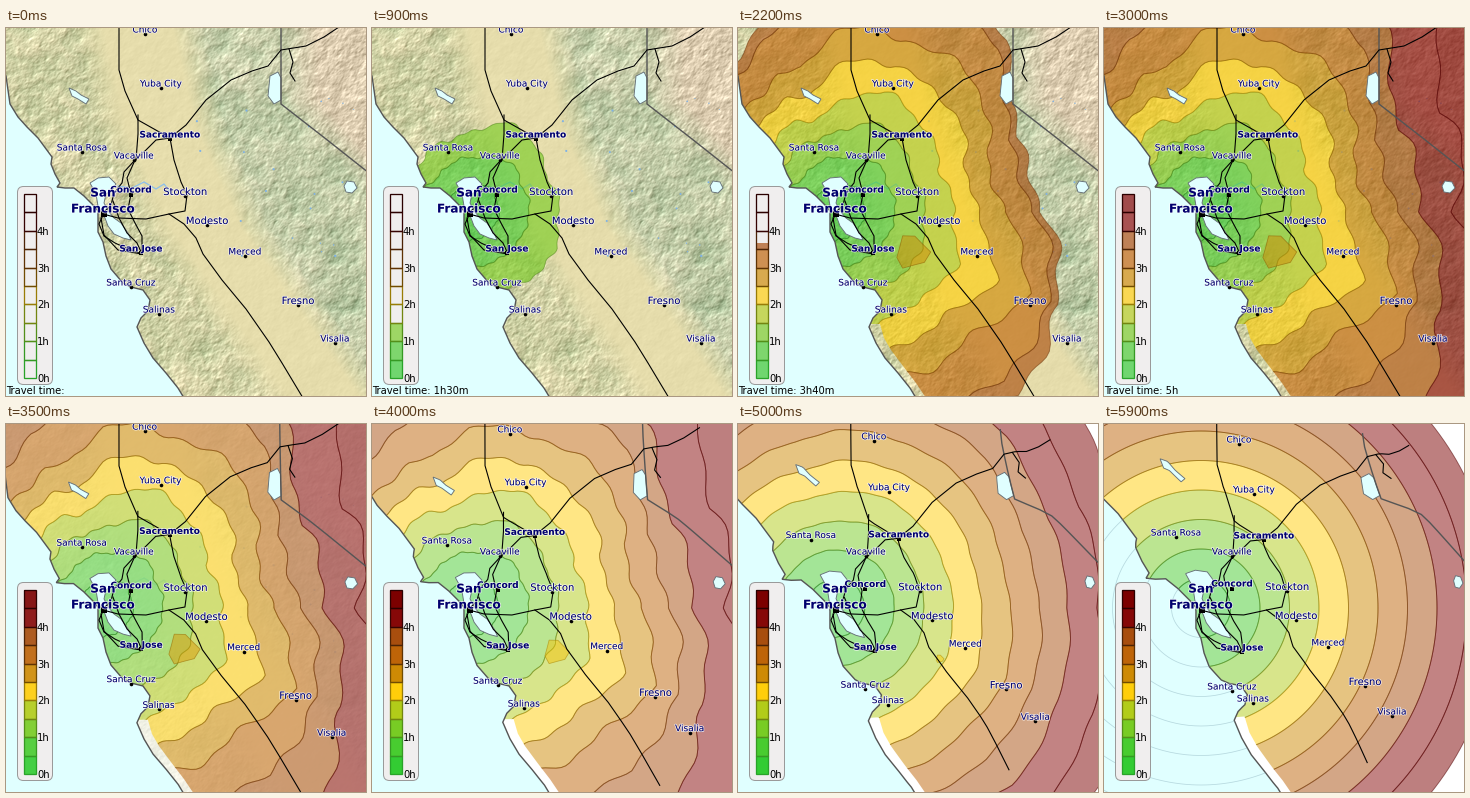
These frames come from a looping animation (360 by 368 pixels, 6 s). A matplotlib script:

```python
import numpy as np
import matplotlib.pyplot as plt
from matplotlib.animation import FuncAnimation
from matplotlib.patches import FancyBboxPatch, PathPatch, Polygon, Rectangle
from matplotlib.path import Path
from matplotlib.patheffects import withStroke

W, H = 360, 368
PX = 0.72  # points per pixel at 100 dpi
FRAMES, GROW = 60, 30
HOUR = 59  # final pixels per hour of travel
CENTER = np.array([97, 184])
NAVY = "#00006e"
WATER = "#e0ffff"

BANDS = np.array([
    (51, 204, 51), (72, 204, 48), (120, 204, 36), (178, 204, 25),
    (255, 206, 10), (206, 138, 4), (190, 100, 8), (168, 78, 14),
    (134, 8, 8), (124, 0, 0)]) / 255

# Direction in degrees (clockwise from east), then reach in pixels after 1..5 hours
REACH = np.array([
    (-157.5, 50, 100, 150, 200, 250), (-135, 48, 92, 134, 190, 250),
    (-112.5, 50, 97, 150, 225, 285), (-103, 52, 97, 147, 228, 290),
    (-90, 55, 107, 176, 240, 310), (-67.5, 60, 128, 193, 260, 340),
    (-45, 64, 128, 190, 258, 400), (-22.5, 60, 110, 166, 217, 300),
    (0, 59, 121, 167, 217, 300), (22.5, 60, 130, 208, 270, 390),
    (45, 55, 122, 188, 290, 400), (67.5, 56, 122, 173, 228, 300),
    (90, 58, 118, 177, 236, 295), (180, 59, 118, 177, 236, 295)])
KNOTS = np.array([0, 1, 2, 3, 4, 5, 9])

# name, label x/y, marker offset y, final shift x/y, size, weight
CITIES = [
    ("Chico", 139, 2, 4, -4, 14, 9, "normal"),
    ("Yuba City", 155, 56, 4, -5, 10, 9, "normal"),
    ("Sacramento", 164, 107, 4, -4, 5, 9, "bold"),
    ("Santa Rosa", 76, 120, 4, -4, -11, 9, "normal"),
    ("Vacaville", 128, 128, 4, 0, 0, 9, "normal"),
    ("Concord", 125, 162, 5, 3, -2, 9, "bold"),
    ("Stockton", 179, 164, 4, 4, -1, 10, "normal"),
    ("Modesto", 201, 193, 4, -9, -1, 10, "normal"),
    ("Merced", 239, 224, 4, -15, -5, 9, "normal"),
    ("Fresno", 292, 273, 4, -31, -15, 10, "normal"),
    ("Visalia", 329, 311, 4, -41, -23, 9, "normal"),
    ("San Jose", 135, 221, 4, 3, 3, 9, "bold"),
    ("Santa Cruz", 125, 255, 4, 3, 8, 9, "normal"),
    ("Salinas", 153, 282, 4, -4, -7, 9, "normal")]

COAST = [(-30, -10), (0, 48), (4, 76), (12, 89), (21, 99), (32, 110), (46, 129),
         (45, 136), (49, 146), (54, 155), (51, 159), (59, 160), (68, 160),
         (78, 168), (88, 178), (92, 183), (92, 204), (97, 214), (100, 228),
         (105, 241), (117, 255), (125, 259), (137, 262), (144, 272), (142, 283),
         (135, 290), (131, 299), (138, 315), (147, 330), (160, 345), (172, 360),
         (190, 390)]
INLAND = [(192, 376), (178, 355), (165, 338), (153, 322), (146, 310), (142, 296)]
LAKES = [
    [(84, 155), (92, 150), (103, 149), (110, 156), (106, 162), (100, 166),
     (98, 175), (103, 184), (108, 190), (115, 195), (122, 205), (125, 212),
     (117, 210), (108, 206), (102, 198), (99, 190), (95, 184), (92, 178), (90, 166)],
    [(264, 48), (272, 44), (275, 50), (275, 72), (268, 76), (262, 68)],
    [(63, 60), (70, 63), (75, 67), (83, 71), (80, 76), (72, 71), (66, 68)],
    [(338, 158), (341, 153), (348, 154), (351, 160), (346, 165), (340, 164)]]
ROADS = [
    [(113, -8), (113, 42), (119, 63), (132, 92), (164, 110)],
    [(132, 87), (132, 106), (130, 132)],
    [(164, 110), (180, 97), (200, 72), (225, 52), (246, 43), (262, 38),
     (275, 22), (300, 18), (318, 9), (336, -3)],
    [(283, 21), (287, 34), (284, 45), (289, 53)],
    [(164, 110), (150, 112), (140, 122), (129, 132), (118, 144), (116, 155),
     (108, 165), (105, 177), (97, 185)],
    [(164, 110), (168, 132), (175, 154), (181, 167), (179, 183), (163, 186)],
    [(97, 186), (112, 190), (140, 191), (163, 186), (178, 196), (190, 210),
     (197, 226), (216, 252), (240, 281), (263, 314), (276, 335), (297, 370)],
    [(97, 187), (93, 196), (98, 208), (109, 215), (122, 221), (136, 226)],
    [(95, 190), (98, 207), (112, 222), (136, 226)],
    [(107, 173), (113, 190), (121, 205), (131, 215), (136, 226)],
    [(129, 132), (121, 150), (125, 166), (122, 181), (129, 195), (136, 208), (136, 226)]]
BORDER = [(275, -8), (275, 76), (320, 111), (368, 149)]


def knots_at(deg):
    """Reach at every time knot for each direction."""
    cols = [np.interp(deg, REACH[:, 0], col, period=360) for col in REACH[:, 1:].T]
    return np.column_stack([0 * deg, *cols, cols[-1] * 1.8])


def densify(pts, n=5):
    pts = np.array(pts, float)
    i = np.linspace(0, len(pts) - 1, n * (len(pts) - 1) + 1)
    return np.column_stack([np.interp(i, range(len(pts)), c) for c in pts.T])


def warp(pts):
    """Place each point at a distance proportional to its travel time."""
    off = pts - CENTER
    dist = np.hypot(*off.T)
    reach = knots_at(np.degrees(np.arctan2(off[:, 1], off[:, 0])))
    hours = np.array([np.interp(d, r, KNOTS) for d, r in zip(dist, reach)])
    return CENTER + off * (hours * HOUR / np.maximum(dist, 1))[:, None]


class Shape:
    """A point list that moves from its map place to its travel-time place."""

    def __init__(self, pts, tail=(), n=5):
        self.start = densify(pts, n)
        self.end = warp(self.start)
        self.tail = np.array(tail, float).reshape(-1, 2)

    def at(self, s):
        return np.vstack([self.start + (self.end - self.start) * s, self.tail])


ANGLE = np.linspace(0, 2 * np.pi, 241)
UNIT = np.column_stack([np.cos(ANGLE), np.sin(ANGLE)])
KNOT_R = knots_at(np.degrees(ANGLE))


def contour(hours, s):
    r = np.array([np.interp(hours, KNOTS, k) for k in KNOT_R])
    wobble = (0.026 * np.sin(7 * ANGLE + 2.1 * hours) + 0.02 * np.sin(13 * ANGLE - 1.7 * hours)
              + 0.013 * np.sin(29 * ANGLE + hours))
    r = r * (1 + wobble) * (1 - s) + hours * HOUR * s
    return CENTER + UNIT * r[:, None]


def ring(inner, outer):
    pts = np.vstack([outer, inner[::-1]])
    codes = np.full(len(pts), Path.LINETO)
    codes[[0, len(outer)]] = Path.MOVETO
    return Path(pts, codes)


def terrain():
    rng = np.random.default_rng(4)
    fy, fx = np.fft.fftfreq(H)[:, None], np.fft.fftfreq(W)[None]
    freq = np.hypot(fx, fy) + 0.012
    relief = np.fft.ifft2(np.fft.fft2(rng.standard_normal((H, W))) * freq ** -1.7).real
    shade = np.gradient(relief, axis=1) + np.gradient(relief, axis=0)
    shade /= shade.std()
    y, x = np.mgrid[:H, :W]
    mid = np.interp(y, [0, 100, 200, 330, 368], [132, 155, 200, 292, 318])
    rough = np.clip((np.abs(x - mid) - 34) / 32, 0, 1)[..., None]
    desert = np.clip((x - 272 - 0.9 * np.maximum(y - 70, 0)) / 40, 0, 1)[..., None]
    hills = np.where((x > mid)[..., None], (192, 202, 166), (204, 206, 162))
    hills = hills + 9 * (relief / relief.std())[..., None] * np.array([1, 0.6, 0.7])
    hills = hills * (1 - desert) + np.array([222, 206, 178]) * desert
    rgb = np.array([230, 221, 172]) * (1 - rough) + hills * rough
    rgb = rgb + shade[..., None] * (2 + 13 * rough)
    return np.clip(rgb / 255, 0, 1)


def rgba(color, alpha):
    return (*color, alpha)


def clock(minutes):
    h, m = divmod(minutes, 60)
    return (f"{h}h" if h else "") + (f"{m}m" if m else "")


fig = plt.figure(figsize=(W / 100, H / 100), dpi=100, facecolor="white")
ax = fig.add_axes([0, 0, 1, 1])
ax.axis("off")
land = ax.imshow(terrain(), extent=(0, W, H, 0), aspect="auto", zorder=0)
ax.set_xlim(0, W)
ax.set_ylim(H, 0)

rng = np.random.default_rng(9)
ponds = ax.scatter(rng.uniform(190, 350, 22), rng.uniform(60, 230, 22),
                   s=rng.uniform(0.5, 3, 22), c="#7fb2e5", lw=0, zorder=1)
delta = ax.plot([112, 126, 138, 150, 158, 166], [158, 160, 154, 161, 156, 166],
                color="#8ec0ea", lw=1.3 * PX, zorder=1)[0]

bands = [ax.add_patch(PathPatch(Path([(0, 0)]), lw=0.9 * PX, zorder=2)) for _ in BANDS]
hill = ax.add_patch(Polygon([(0, 0)], lw=0.8 * PX, zorder=3))

reach = Shape(INLAND, [(90, 296), (-400, 296), (-400, -400), (900, -400), (900, 900), (220, 900)])
coast = Shape(COAST, [(-300, 420), (-300, -10)])
ocean = ax.add_patch(Polygon([(0, 0)], fc=WATER, ec="#555555", lw=1.4 * PX, zorder=4))
lakes = [(Shape(p + p[:1]), ax.add_patch(Polygon([(0, 0)], fc=WATER, ec="#667077",
                                                 lw=0.9 * PX, zorder=4))) for p in LAKES]
sea_rings = [ax.plot([], [], color="#8fb4c0", lw=0.8 * PX, zorder=5)[0] for _ in BANDS]

lines = [(Shape(BORDER), ax.plot([], [], color="#555555", lw=1.4 * PX, zorder=6)[0])]
lines += [(Shape(p), ax.plot([], [], color="black", lw=1.1 * PX, zorder=7)[0]) for p in ROADS]

halo = [withStroke(linewidth=1.6 * PX, foreground=(1, 1, 1, 0.75))]
labels = []
for name, x, y, dy, mx, my, size, weight in CITIES:
    mark = "s" if weight == "bold" else "o"
    dot = ax.plot([], [], mark, color="black", ms=(5 if weight == "bold" else 3.6) * PX,
                  mew=0, zorder=8)[0]
    text = ax.text(x, y, name, color=NAVY, size=size * PX, weight=weight, family="DejaVu Sans",
                   ha="center", va="center", path_effects=halo, zorder=9)
    labels.append((np.array([x, y]), dy, np.array([mx, my]), dot, text))

ax.plot(98, 186, "s", color="black", ms=6 * PX, mew=0, zorder=8)
for word, y in (("San", 165), ("Francisco", 181)):
    ax.text(97, y, word, color=NAVY, size=12 * PX, weight="bold", family="DejaVu Sans",
            ha="center", va="center", path_effects=halo, zorder=9)

# Legend
BASE, STEP, LEFT, WIDE = 350, 18.4, 18, 11.5
ax.add_patch(FancyBboxPatch((15.5, 162.5), 27, 190, boxstyle="round,pad=4,rounding_size=6",
                            fc="#f0eeee", ec="#9a9a9a", lw=1 * PX, zorder=10))
fills = []
for j, c in enumerate(BANDS):
    fills.append(ax.add_patch(Rectangle((LEFT, BASE), WIDE, 0, fc=c, lw=0, zorder=11)))
    ax.add_patch(Rectangle((LEFT, BASE - (j + 1) * STEP), WIDE, STEP, fill=False,
                           ec=c * (0.8 - 0.05 * j), lw=1.3 * PX, zorder=12))
for h in range(5):
    ax.text(31, BASE - 2 * h * STEP, f"{h}h", size=10 * PX, family="DejaVu Sans",
            va="center_baseline", zorder=12)
caption = ax.text(0.5, 366, "", size=10 * PX, family="DejaVu Sans", va="baseline", zorder=12)


def draw(i):
    hours = min(i, GROW) / 6
    u = max(0, i - GROW) / (FRAMES - 1 - GROW)
    s = u * u * (3 - 2 * u)
    fade = min(1, max(0, i - GROW) / 7)

    for art in (land, ponds, delta):
        art.set_alpha(1 - fade)

    clip = Path(reach.at(s))
    cover = 0.64 - 0.14 * fade
    edges = [contour(min(hours, j / 2), s) for j in range(len(BANDS) + 1)]
    for j, (band, c) in enumerate(zip(bands, BANDS)):
        band.set_visible(hours > j / 2)
        band.set_path(ring(edges[j], edges[j + 1]))
        band.set_facecolor(rgba(c, cover))
        band.set_edgecolor(rgba(c * 0.65, 0.55))
        band.set_clip_path(clip, ax.transData)

    a = np.linspace(0, 2 * np.pi, 10)[:-1]
    r = 16 * (1 - s) * (1 + 0.2 * np.sin(3 * a + 1))
    hill.set_xy(np.column_stack([174 + 36 * s + r * np.cos(a), 224 + 14 * s + r * np.sin(a)]))
    tone = BANDS[5] + (BANDS[4] - BANDS[5]) * min(1, 3 * s)
    hill.set_facecolor(rgba(tone, 0.5))
    hill.set_edgecolor(rgba(tone * 0.7, 0.6))
    hill.set_visible(hours > 2.2 and s < 0.95)

    shore = coast.at(s)
    ocean.set_xy(shore)
    for shape, patch in lakes:
        patch.set_xy(shape.at(s))
    for edge, line in zip(edges[1:], sea_rings):
        line.set_data(*edge.T)
        line.set_alpha(0.5 * max(0, (s - 0.8) / 0.2))
        line.set_clip_path(Path(shore), ax.transData)
    for shape, line in lines:
        line.set_data(*shape.at(s).T)

    for pos, dy, move, dot, text in labels:
        x, y = pos + move * s
        text.set_position((x, y))
        dot.set_data([x], [y + dy])

    for j, fill in enumerate(fills):
        part = min(1, max(0, hours * 2 - j)) * STEP
        fill.set_y(BASE - j * STEP - part)
        fill.set_height(part)
        fill.set_alpha(0.68 + 0.32 * fade)
    caption.set_text(f"Travel time: {clock(i * 10)}" if i <= GROW else "")


anim = FuncAnimation(fig, draw, frames=FRAMES, interval=100, repeat=True, repeat_delay=0)
plt.show()
```
